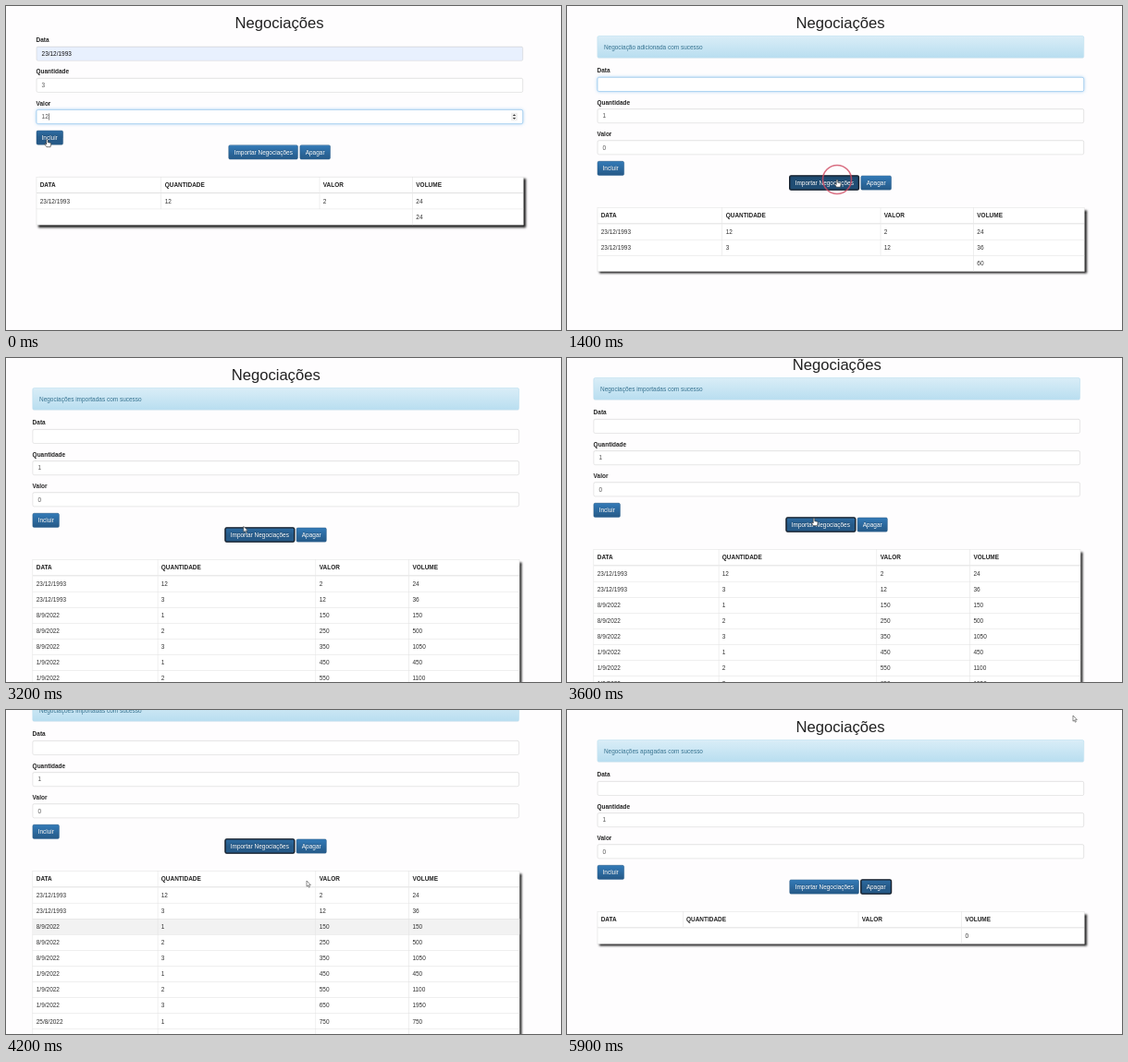
Animation, 600 px wide and 351 px high, one loop 6000 ms. Source, as an HTML page:

```html
<!DOCTYPE html>
<html lang="pt-BR">
<head>
<meta charset="utf-8">
<title>Negociações</title>
<style>
* { box-sizing: border-box; }
html, body { margin: 0; width: 100%; height: 100%; overflow: hidden; background: #fefdfe; }
#stage { position: relative; width: 600px; height: 351px; overflow: hidden; }
#page {
  position: absolute; left: 0; top: 0; width: 1281px; transform-origin: 0 0;
  font: 14px/20px "Liberation Sans", Arial, sans-serif; color: #333;
}
main { width: 1140px; margin: 0 auto; }
h1 { margin: 20px 0 10px; font-size: 36px; font-weight: 500; line-height: 39.6px; text-align: center; color: #222; }
.alert {
  height: 52px; margin-bottom: 20px; padding: 15px; border: 1px solid #9acfea; border-radius: 4px;
  color: #31708f; background: linear-gradient(#d9edf7, #b9def0);
  text-shadow: 0 1px 0 rgba(255,255,255,.2);
  box-shadow: inset 0 1px 0 rgba(255,255,255,.25), 0 1px 2px rgba(0,0,0,.05);
}
.alert:empty { display: none; }
.group { height: 59px; margin-bottom: 15px; }
.group b { display: block; margin-bottom: 5px; color: #222; }
.field {
  position: relative; height: 34px; padding: 6px 12px; border: 1px solid #ccc; border-radius: 4px;
  background: #fff; color: #555; box-shadow: inset 0 1px 1px rgba(0,0,0,.075);
}
.field.focus { border-color: #66afe9; box-shadow: inset 0 1px 1px rgba(0,0,0,.075), 0 0 8px rgba(102,175,233,.6); }
.field.filled { background: #e8f0fe; color: #111; }
.field i { display: none; }
.field.typing i { display: inline-block; width: 1px; height: 16px; margin-left: 1px; background: #000; vertical-align: -3px; }
.field svg { display: none; position: absolute; right: 12px; top: 6px; }
.field.typing svg { display: block; }
.bar { display: flex; height: 34px; gap: 4px; }
.bar.mid { justify-content: center; }
.btn {
  height: 34px; padding: 6px 12px; border: 1px solid #245580; border-radius: 4px; color: #fff;
  background: #337ab7 linear-gradient(#337ab7, #265a88) repeat-x;
  text-shadow: 0 -1px 0 rgba(0,0,0,.2);
  box-shadow: inset 0 1px 0 rgba(255,255,255,.15), 0 1px 1px rgba(0,0,0,.075);
}
.btn.hover, .btn.focus { background-color: #265a88; background-position: 0 -15px; }
.btn.focus { border-color: #122b40; outline: 3px solid #18222e; outline-offset: -2px; }
.btn.active { background: #204d74; box-shadow: inset 0 3px 5px rgba(0,0,0,.125); }
table {
  width: 1140px; margin-top: 41px; table-layout: fixed; border-collapse: collapse;
  background: #fff; box-shadow: 5px 5px 5px #1c1c1c;
}
th, td { height: 37px; padding: 8px; border: 1px solid #ddd; text-align: left; }
th { border-bottom-width: 2px; color: #222; text-transform: uppercase; }
tr.hover { background: #f2f2f2; }
#overlay { position: absolute; left: 0; top: 0; }
</style>
</head>
<body>
<div id="stage">
  <div id="page"><main>
    <h1>Negociações</h1>
    <div class="alert" id="alert"></div>
    <div class="group"><b>Data</b><div class="field" id="date"><span></span></div></div>
    <div class="group"><b>Quantidade</b><div class="field" id="amount"><span></span></div></div>
    <div class="group"><b>Valor</b><div class="field" id="price"><span></span><i></i>
      <svg width="15" height="20"><path fill="#eee" d="M0 0h15v20H0z"/><path fill="#333" d="M4 8l3.5-4L11 8zM4 12l3.5 4L11 12z"/></svg>
    </div></div>
    <div class="bar"><div class="btn" id="add">Incluir</div></div>
    <div class="bar mid"><div class="btn" id="import">Importar Negociações</div><div class="btn" id="clear">Apagar</div></div>
    <table id="table"></table>
  </main></div>
  <svg id="overlay" width="600" height="351">
    <circle id="ring" fill="none" stroke="#d04a62" stroke-width="1.6"/>
    <g id="cursor" stroke-linejoin="round">
      <path id="arrow" fill="#fff" stroke="#444" stroke-width=".6" d="M0 0V6.2L1.4 5 2.4 7.2 3.4 6.8 2.5 4.6H4.4Z"/>
      <path id="hand" fill="#fff" stroke="#222" stroke-width=".6"
        d="M-.8 .6Q0-.6.8.6V3.2L3.6 3.8Q4.3 4 4.2 5L3.6 8.2H-.6L-2.6 5.2Q-2.5 4.2-1.6 4.7L-.8 5.5Z"/>
    </g>
  </svg>
</div>
<script>
const LOOP = 6000, STEP = 100, SCALE = 600 / 1300;
const $ = id => document.getElementById(id);

// time, x, y
const PATH = [
  [0, 44.5, 144.5], [300, 46, 150], [800, 46, 150], [1300, 292, 188], [1700, 292, 188],
  [2500, 225, 169], [2800, 225, 169], [3400, 268, 187], [3600, 267, 173.5], [3900, 325, 185],
  [4200, 325, 185], [4700, 329.5, 198.5], [4900, 329.5, 198.5], [5400, 547, 18], [5500, 547, 18], [5900, 547, 6]
];
const SCROLL = [[3500, 0], [3600, 11], [3900, 96], [4000, 96], [4200, 44], [4400, 0]];
const PRESSES = { add: [400, 700], import: [1300, 1500], clear: [4700, 4900] };
const FOCUS = { price: [0, 400], add: [400, 800], date: [800, 1500], import: [1300, 4700], clear: [4700, LOOP] };
const HOVER = { add: [[0, 900]], import: [[1200, 1900], [3300, 3700]], clear: [[4400, 5000]] };
const ADDED = 800, IMPORTED = 3000, CLEARED = 4900;

const FIRST = ["23/12/1993", 12, 2], SECOND = ["23/12/1993", 3, 12];
const BATCH = ["8/9/2022", "1/9/2022", "25/8/2022"].flatMap((day, i) =>
  [1, 2, 3].map(n => [day, n, 100 * (3 * i + n) + 50]));
const WIDE = [292.5, 370.5, 218, 259], EMPTY = [200, 411, 242, 287];

const within = (t, span) => !!span && t >= span[0] && t < span[1];

function track(points, t) {
  const next = points.findIndex(p => p[0] > t);
  if (next === 0) return points[0].slice(1);
  if (next < 0) return points[points.length - 1].slice(1);
  const a = points[next - 1], b = points[next];
  const u = (t - a[0]) / (b[0] - a[0]), ease = u * u * (3 - 2 * u);
  return a.slice(1).map((v, i) => v + (b[i + 1] - v) * ease);
}

function rowsAt(t) {
  if (t >= CLEARED) return [];
  if (t >= IMPORTED) return [FIRST, SECOND, ...BATCH];
  return t >= ADDED ? [FIRST, SECOND] : [FIRST];
}

function messageAt(t) {
  if (t >= CLEARED) return "Negociações apagadas com sucesso";
  if (t >= IMPORTED) return "Negociações importadas com sucesso";
  return t >= ADDED ? "Negociação adicionada com sucesso" : "";
}

function tableHtml(rows) {
  const cells = (tag, list) => list.map(v => `<${tag}>${v}</${tag}>`).join("");
  const cols = (rows.length ? WIDE : EMPTY).map(w => `<col style="width:${w}px">`).join("");
  const body = rows.map(r => `<tr>${cells("td", [...r, r[1] * r[2]])}</tr>`).join("");
  const total = rows.reduce((sum, r) => sum + r[1] * r[2], 0);
  return `${cols}<tr>${cells("th", ["Data", "Quantidade", "Valor", "Volume"])}</tr>${body}` +
    `<tr><td colspan="3"></td><td>${total}</td></tr>`;
}

function drawPage(t) {
  const rows = rowsAt(t), fresh = t >= ADDED;
  if ($("table").dataset.count !== String(rows.length)) {
    $("table").dataset.count = rows.length;
    $("table").innerHTML = tableHtml(rows);
  }
  $("alert").textContent = messageAt(t);
  const values = { date: fresh ? "" : "23/12/1993", amount: fresh ? 1 : 3, price: fresh ? 0 : 12 };
  for (const id in values) {
    $(id).firstElementChild.textContent = values[id];
    $(id).classList.toggle("focus", within(t, FOCUS[id]));
  }
  $("date").classList.toggle("filled", !fresh);
  $("price").classList.toggle("typing", within(t, FOCUS.price));
  for (const id in PRESSES) {
    $(id).classList.toggle("focus", within(t, FOCUS[id]));
    $(id).classList.toggle("active", within(t, PRESSES[id]));
    $(id).classList.toggle("hover", HOVER[id].some(s => within(t, s)));
  }
  if (rows.length > 3) $("table").rows[3].classList.toggle("hover", within(t, [3800, 4300]));
  // the page narrows while it needs a scrollbar
  $("page").style.width = (rows.length > 3 ? 1264 : 1281) + "px";
  $("page").style.transform = `translateY(${-track(SCROLL, t)[0]}px) scale(${SCALE})`;
}

function drawPointer(t) {
  const [x, y] = track(PATH, t);
  const pointing = Object.values(HOVER).flat().some(s => within(t, s));
  $("cursor").setAttribute("transform", `translate(${x} ${y})`);
  $("hand").style.display = pointing ? "" : "none";
  $("arrow").style.display = pointing ? "none" : "";

  const press = Object.values(PRESSES).find(([from, to]) => within(t, [from, to + STEP]));
  const ring = $("ring");
  ring.style.display = press ? "" : "none";
  if (!press) return;
  ring.setAttribute("cx", x);
  ring.setAttribute("cy", y);
  ring.setAttribute("r", t === press[0] ? 10 : 15.5);
  ring.setAttribute("opacity", t >= press[1] ? .35 : .8);
}

let start, last = -1;
function frame(now) {
  start ??= now;
  const t = Math.floor((now - start) % LOOP / STEP) * STEP;
  if (t !== last) {
    last = t;
    drawPage(t);
    drawPointer(t);
  }
  requestAnimationFrame(frame);
}
requestAnimationFrame(frame);
</script>
</body>
</html>
```
